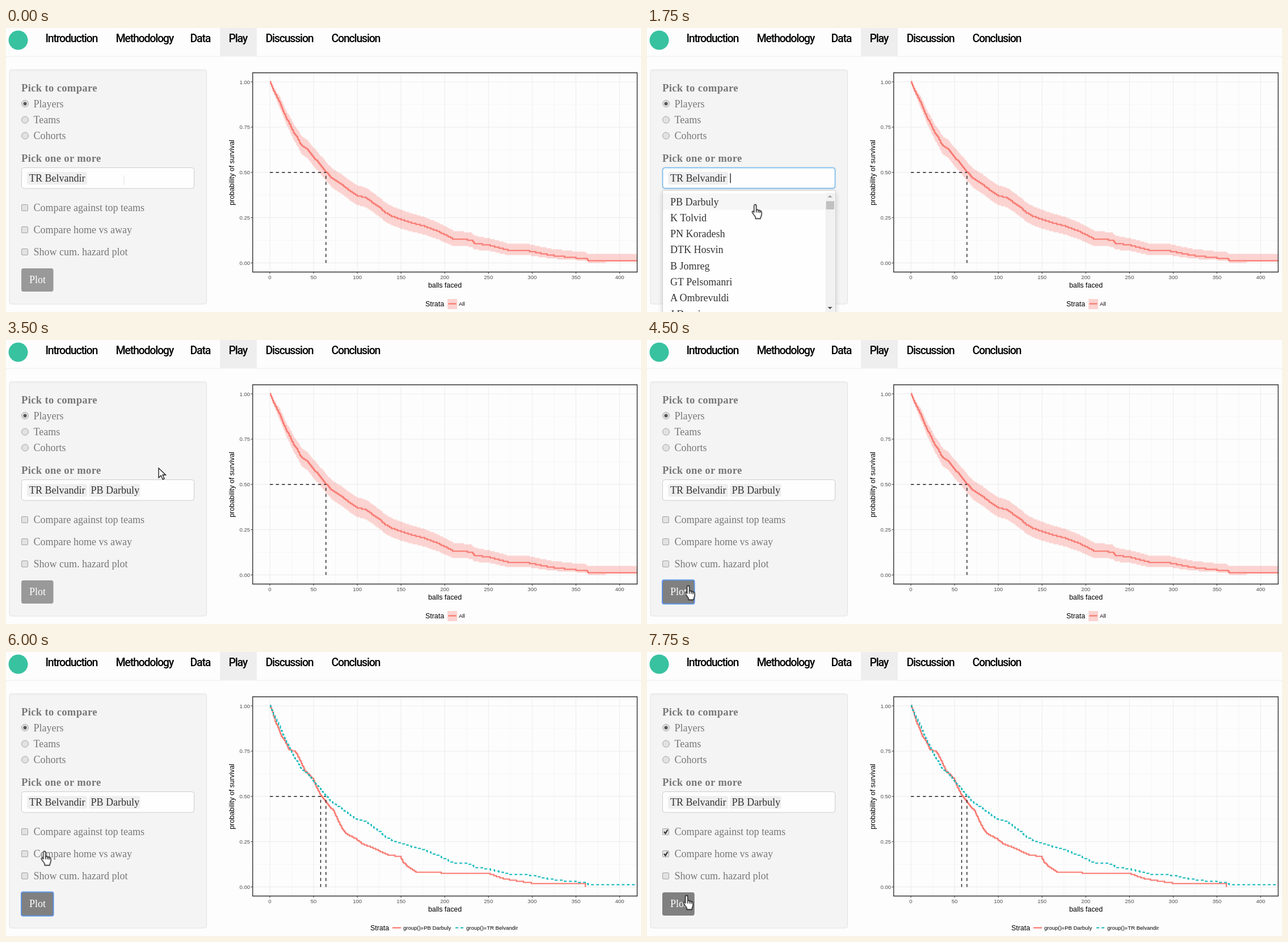
An HTML page that plays this animation: 1119 px wide and 501 px high, repeating every 8000 ms.

```html
<!DOCTYPE html>
<html lang="en">
<head>
<meta charset="utf-8">
<title>Survival curves</title>
<style>
html, body { margin: 0; width: 100%; height: 100%; overflow: hidden; background: #fdfdfd; }
svg { display: block; width: 100%; height: 100%; }
text { white-space: pre; }
.nav { font: 500 19.5px Roboto, sans-serif; letter-spacing: -1.2px; fill: #000; }
.form { font: 18px "Liberation Serif", serif; fill: #777; }
.form .head { font-weight: bold; font-size: 18.5px; letter-spacing: .38px; }
.form .dark { fill: #333; }
.plot { font: 9.5px "Liberation Sans", sans-serif; fill: #4d4d4d; }
.plot .title { font-size: 12.4px; fill: #000; }
.plot .key { fill: #000; }
.major { stroke: #ebebeb; fill: none; }
.minor { stroke: #f0f0f0; stroke-width: .6; fill: none; }
.axis { stroke: #333; fill: none; }
.median { stroke: #1c1c1c; stroke-width: 1.4; stroke-dasharray: 5.3; fill: none; }
.red { stroke: #f8766d; stroke-width: 2.2; fill: none; }
.teal { stroke: #12b8bb; stroke-width: 2.2; stroke-dasharray: 5 4; fill: none; }
.band { fill: #f8766d; fill-opacity: .3; }
.control { fill: #e2e2e2; stroke: #a3a3a3; }

.anim { animation: 8s step-end -8ms infinite; }
#focus, #menu { animation-name: open; }
#items { animation-name: shift; }
#caret { animation-name: caret; }
#chip { animation-name: chip; }
#hover { animation-name: hover; }
#ring { animation-name: ring; }
#single { animation-name: single; }
#pair { animation-name: pair; }
#away { animation-name: away; }
#top { animation-name: top; }
#pointer { animation-name: move; }
#beam { animation-name: beam; }
#arrow { animation-name: arrow; }
#hand { animation-name: hand; }

@keyframes open { 0%, 43.75%, 100% { opacity: 0 } 3.125% { opacity: 1 } }
@keyframes shift { 0% { transform: translateY(0) } 34.375%, 100% { transform: translateY(-28.3px) } }
@keyframes caret {
  0%, 15.625%, 100% { opacity: 0; transform: none }
  3.125%, 21.875% { opacity: 1; transform: none }
  28.125% { opacity: 0; transform: none }
  34.375% { opacity: 1; transform: translateX(93px) }
  40.625% { opacity: 0; transform: translateX(93px) }
}
@keyframes chip { 0% { opacity: 0 } 34.375%, 100% { opacity: 1 } }
@keyframes hover { 0%, 84.375% { opacity: 0 } 53.125%, 96.875%, 100% { opacity: 1 } }
@keyframes ring { 0%, 84.375%, 100% { opacity: 0 } 56.25% { opacity: 1 } }
@keyframes single { 0% { opacity: 1 } 75%, 100% { opacity: 0 } }
@keyframes pair { 0% { opacity: 0 } 75%, 100% { opacity: 1 } }
@keyframes away { 0% { opacity: 0 } 84.375%, 100% { opacity: 1 } }
@keyframes top { 0% { opacity: 0 } 93.75%, 100% { opacity: 1 } }
@keyframes beam { 0%, 37.5% { opacity: 1 } 12.5%, 40.625%, 100% { opacity: 0 } }
@keyframes arrow { 0%, 53.125%, 100% { opacity: 0 } 40.625% { opacity: 1 } }
@keyframes hand { 0%, 37.5% { opacity: 0 } 12.5%, 53.125%, 100% { opacity: 1 } }
@keyframes move {
  0% { transform: translate(208px, 260px) }
  6.25% { transform: translate(207px, 266px) }
  9.375% { transform: translate(206px, 270px) }
  12.5% { transform: translate(189px, 292px) }
  15.625% { transform: translate(185px, 304px) }
  18.75% { transform: translate(184px, 310px) }
  25% { transform: translate(184px, 314px) }
  37.5% { transform: translate(236px, 258px) }
  40.625% { transform: translate(268px, 226px) }
  43.75% { transform: translate(268px, 225px) }
  46.875% { transform: translate(144px, 352px) }
  50% { transform: translate(98px, 400px) }
  53.125% { transform: translate(66px, 432px) }
  59.375% { transform: translate(62px, 436px) }
  62.5% { transform: translate(62px, 432px) }
  65.625% { transform: translate(63px, 390px) }
  68.75% { transform: translate(61px, 350px) }
  87.5% { transform: translate(72px, 334px) }
  90.625% { transform: translate(90px, 314px) }
  93.75% { transform: translate(86px, 320px) }
  96.875%, 100% { transform: translate(63px, 428px) }
}
</style>
</head>
<body>
<svg viewBox="0 0 1119 501" preserveAspectRatio="none">
  <defs>
    <clipPath id="listClip"><rect x="28" y="291" width="286" height="210"/></clipPath>
    <filter id="soft" x="-10%" y="-10%" width="120%" height="120%"><feGaussianBlur stdDeviation="4"/></filter>
    <path id="tick" d="M-3 0l2.5 3 4-6.5" fill="none" stroke="#333" stroke-width="2.2"/>
    <rect id="field" x="27.5" y="246.5" width="304" height="36.5" rx="4"/>
  </defs>

  <g class="nav">
    <path d="M377 0h65v49h-65z" fill="#eee"/>
    <path d="M0 50h1119" stroke="#ececec"/>
    <circle cx="21.5" cy="21.5" r="17" fill="#38c2a0"/>
    <text x="69.5" y="24.5">Introduction</text>
    <text x="193.5" y="24.5">Methodology</text>
    <text x="324.5" y="24.5">Data</text>
    <text x="392.5" y="24.5">Play</text>
    <text x="457.5" y="24.5">Discussion</text>
    <text x="573.5" y="24.5">Conclusion</text>
  </g>

  <g class="plot">
    <g id="grid"></g>
    <g id="single" class="anim">
      <path class="band" id="band"/>
      <path class="red" id="allCurve"/>
      <path class="median" d="M465 254.7H563.8M563.8 414.5V254.7"/>
      <text class="title" x="739" y="491">Strata</text>
      <path class="band" d="M778 478h17v18h-17z"/>
      <path class="red" d="M779.5 486.5h14"/>
      <text class="key" x="798" y="490">All</text>
    </g>
    <g id="pair" class="anim">
      <path class="red" id="firstCurve"/>
      <path class="teal" id="secondCurve"/>
      <path class="median" d="M465 254.7H563.8M465 254.7H563.8M563.8 414.5V254.7M554.5 414.5V254.7"/>
      <text class="title" x="642" y="491">Strata</text>
      <path class="red" d="M681 486.5h15"/>
      <text class="key" x="700" y="490">group()=PB Darbuly</text>
      <path class="teal" d="M792 486.5h15"/>
      <text class="key" x="811" y="490">group()=TR Belvandir</text>
    </g>
    <path class="axis" stroke-width="1.4" d="M434.7 79H1112.3V430.5H434.7z"/>
    <text class="title" x="773.5" y="458" text-anchor="middle">balls faced</text>
    <text class="title" transform="translate(402 255) rotate(-90)" text-anchor="middle">probability of survival</text>
  </g>

  <g class="form">
    <rect x="6" y="73.5" width="347.5" height="413.5" rx="4" fill="#f4f4f4" stroke="#e2e2e2"/>
    <path d="M8 75.5h343" stroke="#ececec"/>
    <text class="head" x="27" y="111.5">Pick to compare</text>
    <g class="control">
      <circle cx="33.5" cy="133.5" r="6"/>
      <circle cx="33.5" cy="162" r="6"/>
      <circle cx="33.5" cy="190" r="6"/>
      <rect x="27.5" y="311.5" width="11" height="11" rx="1.5"/>
      <rect x="27.5" y="350.5" width="11" height="11" rx="1.5"/>
      <rect x="27.5" y="389.5" width="11" height="11" rx="1.5"/>
    </g>
    <circle cx="33.5" cy="133.5" r="3" fill="#555"/>
    <text x="48.5" y="139.5">Players</text>
    <text x="48.5" y="168">Teams</text>
    <text x="48.5" y="196">Cohorts</text>
    <text class="head" x="27" y="235.5">Pick one or more</text>
    <text x="48.5" y="323">Compare against top teams</text>
    <text x="48.5" y="362">Compare home vs away</text>
    <text x="48.5" y="401">Show cum. hazard plot</text>
    <use id="top" class="anim" href="#tick" x="33" y="317"/>
    <use id="away" class="anim" href="#tick" x="33" y="356"/>

    <rect x="27" y="424" width="56.5" height="41" rx="4" fill="#999"/>
    <rect id="hover" class="anim" x="27" y="424" width="56.5" height="41" rx="4" fill="#808080"/>
    <rect id="ring" class="anim" x="27" y="423.5" width="56.5" height="42" rx="3" fill="none" stroke="#5b92e0" stroke-width="2"/>
    <text x="41" y="450" style="fill:#fff">Plot</text>

    <use href="#field" fill="#fefefe" stroke="#ccc"/>
    <g id="focus" class="anim" fill="none" stroke="#66afe9">
      <use href="#field" stroke-opacity=".18" stroke-width="4"/>
      <use href="#field"/>
    </g>
    <rect x="37" y="254" width="106" height="22.5" rx="3" fill="#efefef"/>
    <text class="dark" x="41" y="271">TR Belvandir</text>
    <g id="chip" class="anim">
      <rect x="146" y="254" width="90.5" height="22.5" rx="3" fill="#efefef"/>
      <text class="dark" x="149.5" y="271">PB Darbuly</text>
    </g>
    <path id="caret" class="anim" d="M147 256.5v17" stroke="#222" stroke-width="1.4"/>

    <g id="menu" class="anim">
      <rect x="27" y="290" width="306" height="230" opacity=".17" fill="#000" filter="url(#soft)"/>
      <path d="M27.5 286.5H332V510H27.5z" fill="#fefefe" stroke="#d0d0d0"/>
      <path d="M28 292h286v28.5H28z" fill="#f6f6f6"/>
      <g clip-path="url(#listClip)"><g id="items" class="anim"></g></g>
      <path d="M314.5 291h16v210h-16z" fill="#f1f1f1"/>
      <path d="M315.5 305.5h14.5v14.5h-14.5z" fill="#c1c1c1"/>
      <path d="M318.5 299l4-4 4 4z" fill="#a3a3a3"/>
      <path d="M318.5 492l4 4 4-4z" fill="#505050"/>
    </g>
  </g>

  <g id="pointer" class="anim">
    <path id="beam" class="anim" d="M0 0v17" stroke="#e6e6e6" stroke-width="1.2"/>
    <path id="arrow" class="anim" d="M1 1v17l4-4 3.2 7 2.8-1.3-3-6.7h5.5z" fill="#fff" stroke="#111" stroke-width="1.3"/>
    <g id="hand" class="anim" stroke="#111" stroke-width="1.3" stroke-linejoin="round">
      <g transform="translate(.3 .5) scale(1.05)">
        <path d="M6 1c2 0 2 1.5 2 2.5v7l1-.8c1-.5 2 0 2.3 1 1-.6 2.2-.3 2.6.8 1.2-.5 2.5.2 2.7 1.5l.4 3.5c0 3-1.5 5-2 7v1H6.5V22C5 19 2 16.5 1 13.5c-.3-1.5 1.5-2 2.5-.8L4.2 14V3C4.2 1.8 4.8 1 6 1z" fill="#fff"/>
        <path d="M8 10.5v4M11.3 11v3.5M14 12v3" fill="none"/>
      </g>
    </g>
  </g>
</svg>
<script>
const NS = "http://www.w3.org/2000/svg";
const byId = id => document.getElementById(id);

function add(parent, tag, attrs, text = "") {
  const node = document.createElementNS(NS, tag);
  for (const key in attrs) node.setAttribute(key, attrs[key]);
  node.textContent = text;
  parent.append(node);
}

const names = ["PB Darbuly", "K Tolvid", "PN Koradesh", "DTK Hosvin", "B Jomreg",
  "GT Pelsomanri", "A Ombrevuldi", "J Daspi", "LE Moj"];
names.forEach((name, i) =>
  add(byId("items"), "text", { class: "dark", x: 41, y: 312.5 + 28.3 * i }, name));

const BALL = 1.541;
const px = balls => 465 + balls * BALL;
const py = prob => 414.5 - prob * 319.5;
const grid = byId("grid");
const line = (cls, d) => add(grid, "path", { class: cls, d });

for (let b = 25; b < 420; b += 50) line("minor", `M${px(b)} 79V430`);
for (let p = .125; p < 1; p += .25) line("minor", `M435 ${py(p)}H1112`);
for (let b = 0; b <= 400; b += 50) {
  line("major", `M${px(b)} 79V430`);
  line("axis", `M${px(b)} 430v3.5`);
  add(grid, "text", { x: px(b), y: 443, "text-anchor": "middle" }, b);
}
for (let p = 0; p <= 1; p += .25) {
  line("major", `M435 ${py(p)}H1112`);
  line("axis", `M435 ${py(p)}h-3.5`);
  add(grid, "text", { x: 430, y: py(p) + 3.5, "text-anchor": "end" }, p.toFixed(2));
}

// Linear interpolation through a flat list of x, y pairs.
function sample(points, x) {
  let i = 0;
  while (i < points.length - 4 && points[i + 2] < x) i += 2;
  const [x0, y0, x1, y1] = points.slice(i, i + 4);
  return y0 + (y1 - y0) * Math.min(1, (x - x0) / (x1 - x0));
}

// Staircase centred on the curve: one tread per ball, heights snapped to risers.
function stairs(curve, end, riser = 2) {
  const snap = x => 94.5 + Math.round((curve(x) - 94.5) / riser) * riser;
  let level = snap(px(0));
  const out = [[px(0), level]];
  for (let x = px(0); x < end; x += BALL) {
    const y = snap(x);
    if (y === level) continue;
    out.push([x, level], [x, y]);
    level = y;
  }
  out.push([end, level]);
  return out;
}
const path = vertices => "M" + vertices.map(v => v.map(n => n.toFixed(1)).join(" ")).join("L");

const long = [465,95, 470,107, 475,118, 481,129, 487,143, 493,158, 500,170, 506,183, 514,195,
  520,207, 530,213, 540,226, 550,237, 564,254, 575,266, 590,275, 600,283, 617,295, 635,300,
  650,311, 660,318, 667,325, 680,332, 696,338, 712,343, 735,349, 760,358, 788,372, 820,374,
  825,379.5, 850,383, 885,392, 920,393, 960,401, 998,405, 1023,407, 1025,410.5, 1112,410.5];
const short = [465,95, 470,108, 474,122, 480,135, 485,148, 493,160, 498,172, 509,175, 514,183,
  520,195, 526,209, 535,217, 541,224, 546,237, 555,254, 568,271, 577,280, 583,293, 589,306,
  597,319, 617,330, 627,338, 645,345, 675,359, 694,360, 700,371, 708,379, 722,388, 766,388,
  768,391, 851,391, 877,400, 902,404, 928,408, 1021,408];
const above = [465,0, 470,5, 480,10, 520,16, 620,18, 700,17, 773,15, 850,12, 1112,11];
const below = [465,0, 470,5, 480,10, 520,16, 620,17, 700,16, 773,14, 850,10, 926,7.5, 1000,4, 1112,2];

const longCurve = x => sample(long, x);
const longPath = path(stairs(longCurve, 1112));
const upper = stairs(x => longCurve(x) - sample(above, x), 1112);
const lower = stairs(x => longCurve(x) + sample(below, x), 1112);

byId("band").setAttribute("d", path(upper.concat(lower.reverse())) + "Z");
byId("allCurve").setAttribute("d", longPath);
byId("secondCurve").setAttribute("d", longPath);
byId("firstCurve").setAttribute("d", path(stairs(x => sample(short, x), 1021)) + "V414.5");
</script>
</body>
</html>
```
